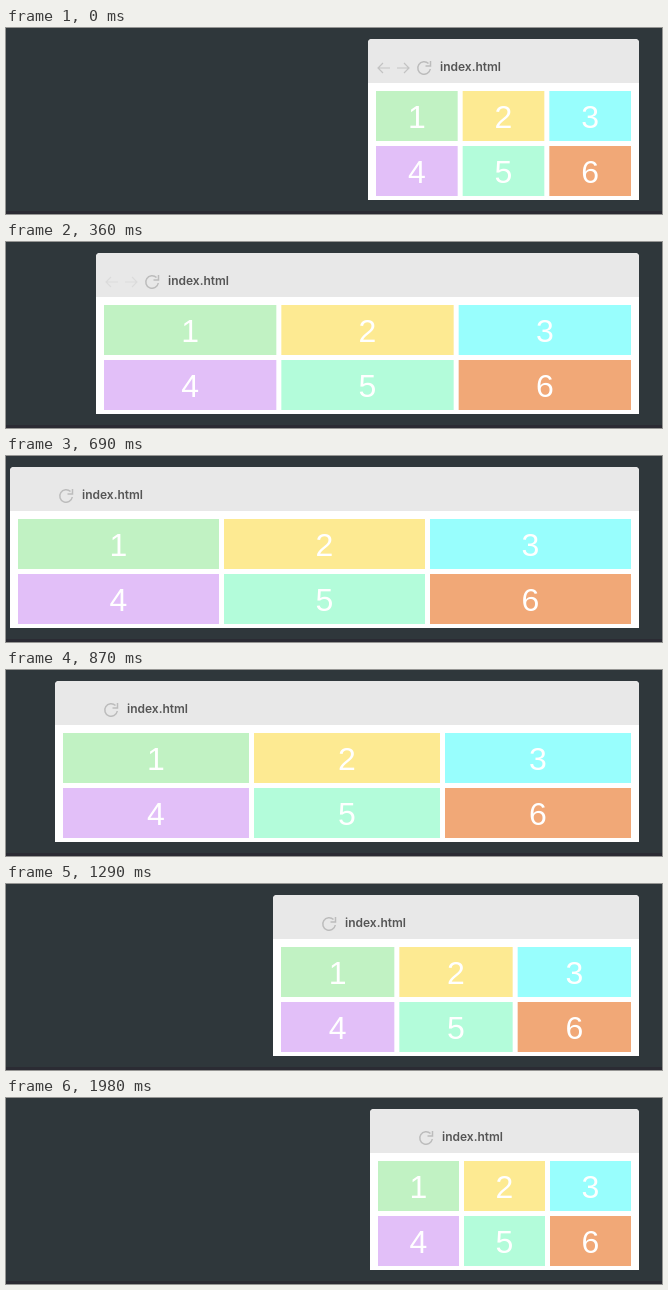
An HTML page for the animation above (2.01 s loop, 656 by 186 pixels).

```html
<!DOCTYPE html>
<html lang="en">
<head>
<meta charset="utf-8">
<title>Resizing grid</title>
<style>
  html, body { margin: 0; width: 100%; height: 100%; overflow: hidden; background: #2f373b; }
  svg { display: block; width: 656px; height: 186px; }
  .digit { font: 32px "Liberation Sans", Arial, sans-serif; fill: #fff; text-anchor: middle; }
  .title { font: 600 12px Inter, Roboto, sans-serif; fill: #555; }
  .icon { fill: none; stroke: #c3c3c3; stroke-width: 1.2; }
</style>
</head>
<body>
<svg viewBox="0 0 656 186">
  <rect width="656" height="186" fill="#2f373b"/>
  <rect y="183" width="656" height="3" fill="#2b2b33"/>
  <path id="page" fill="#fff"/>
  <path id="bar" fill="#e8e8e8"/>
  <g id="tools">
    <g id="arrows" class="icon">
      <path d="M22 40H10M15 35L10 40L15 45"/>
      <path d="M29 40H41M36 35L41 40L36 45"/>
    </g>
    <path class="icon" style="stroke:#bcbcbc;stroke-width:1.5" d="M60.5 35.5A6.3 6.3 0 1 0 62.3 41M62.5 33V38H57.5"/>
    <text class="title" x="72" y="43">index.html</text>
  </g>
  <g id="grid"></g>
</svg>
<script>
const LOOP = 2010, STEP = 30;
const RIGHT = 633, TOP = 11, BAR_BOTTOM = 55, BOTTOM = 172, PAD = 8, GAP = 5;
const COLORS = ["#c1f2c3", "#fdea92", "#98fefd", "#e2bff8", "#b3fcda", "#f1a877"];

// Left edge of the window: [time in ms, x]
const EDGE = [
  [0, 362], [90, 308], [180, 222], [270, 145], [360, 90], [450, 56], [540, 34],
  [630, 13], [700, 4], [780, 14], [860, 44], [1020, 131], [1140, 197],
  [1290, 267], [1440, 306], [1620, 336], [1800, 355], [1980, 364], [2010, 362]
];

const byId = id => document.getElementById(id);
const page = byId("page"), bar = byId("bar"), tools = byId("tools");
const arrows = byId("arrows"), grid = byId("grid");

function make(tag, attrs) {
  const node = document.createElementNS("http://www.w3.org/2000/svg", tag);
  for (const key in attrs) node.setAttribute(key, attrs[key]);
  return grid.appendChild(node);
}

const cells = COLORS.map((fill, i) => {
  const y = 63 + 55 * Math.floor(i / 3);
  const box = make("rect", { y, height: 50, fill });
  const label = make("text", { y: y + 36.5, class: "digit" });
  label.textContent = i + 1;
  return { box, label, column: i % 3 };
});

const slope = i => (EDGE[i + 1][1] - EDGE[i][1]) / (EDGE[i + 1][0] - EDGE[i][0]);

function tangent(i) {
  if (i === 0) return slope(0);
  if (i === EDGE.length - 1) return slope(i - 1);
  const a = slope(i - 1), b = slope(i);
  return a * b <= 0 ? 0 : 2 * a * b / (a + b);
}

// Monotone cubic through the edge positions
function edgeAt(t) {
  let i = 0;
  while (i < EDGE.length - 2 && t >= EDGE[i + 1][0]) i++;
  const [t0, x0] = EDGE[i], [t1, x1] = EDGE[i + 1];
  const h = t1 - t0, u = (t - t0) / h, v = 1 - u;
  return v * v * (1 + 2 * u) * x0 + u * u * (3 - 2 * u) * x1
    + h * u * v * (v * tangent(i) - u * tangent(i + 1));
}

function draw(t) {
  const left = Math.round(edgeAt(t));
  const top = `M${left} ${TOP + 4}Q${left} ${TOP} ${left + 4} ${TOP}H${RIGHT - 4}Q${RIGHT} ${TOP} ${RIGHT} ${TOP + 4}`;
  page.setAttribute("d", `${top}V${BOTTOM}H${left}Z`);
  bar.setAttribute("d", `${top}V${BAR_BOTTOM}H${left}Z`);
  tools.setAttribute("transform", `translate(${left} 0)`);
  arrows.setAttribute("opacity", Math.max(0, 1 - t / 550));

  const width = (RIGHT - left - 2 * PAD - 2 * GAP) / 3;
  for (const { box, label, column } of cells) {
    const x = left + PAD + column * (width + GAP);
    box.setAttribute("x", x);
    box.setAttribute("width", width);
    label.setAttribute("x", x + width / 2);
  }
}

const start = performance.now();
function tick() {
  const t = (performance.now() - start) % LOOP;
  draw(Math.floor(t / STEP) * STEP);
  requestAnimationFrame(tick);
}
draw(0);
requestAnimationFrame(tick);
</script>
</body>
</html>
```
